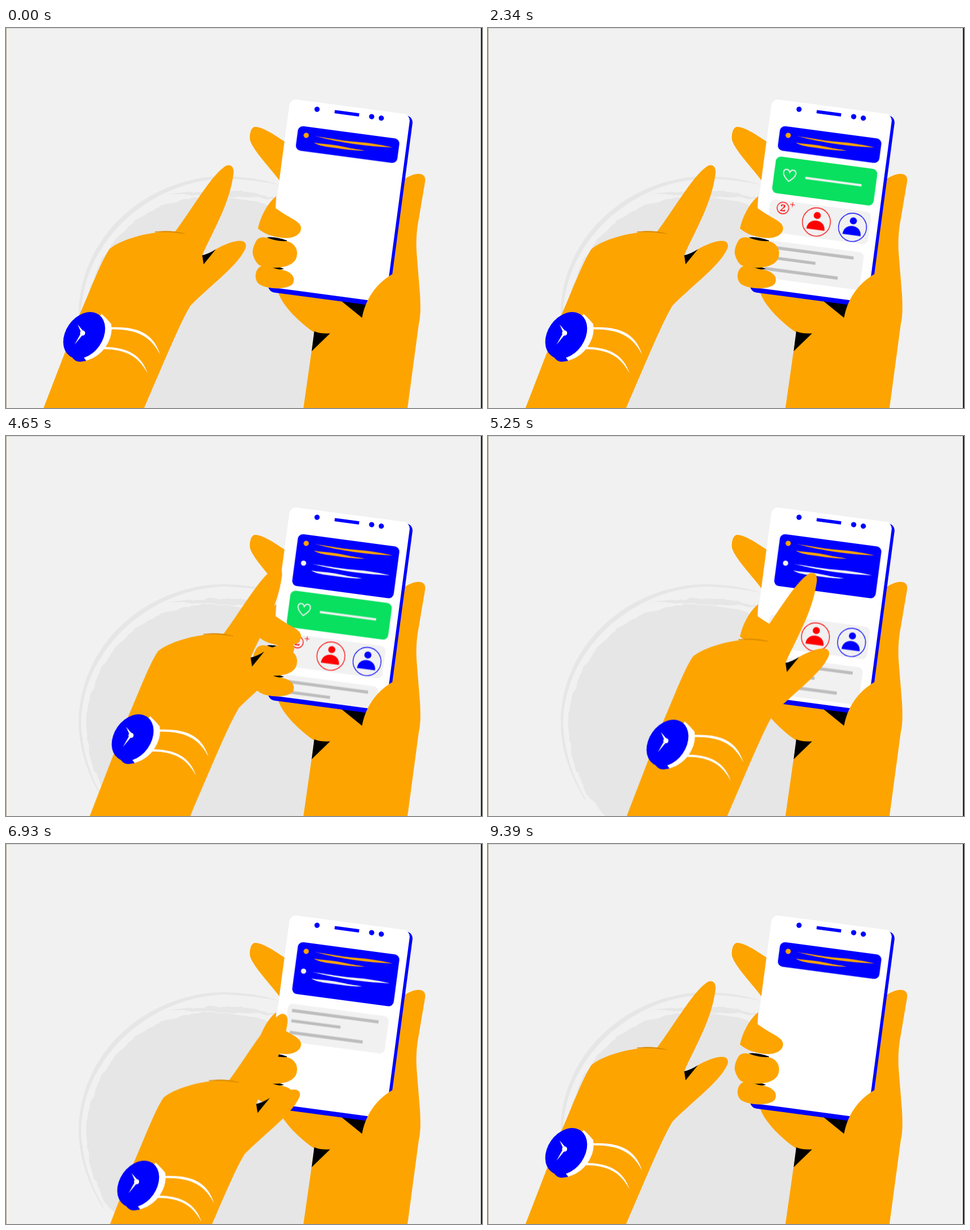
Write an HTML page without scripts that moves like this. It is 837 px wide and 669 px high and loops after 9540 ms.

```html
<!DOCTYPE html>
<html lang="en">
<head>
<meta charset="utf-8">
<title>Swiping cards on a phone</title>
<style>
  html, body { margin: 0; width: 100%; height: 100%; overflow: hidden; background: #f1f1f1; }
  svg { display: block; width: 837px; height: 669px; }
  .skin { fill: #fda400; }
  .blue { fill: #00f; }
  .panel { fill: #f1f1f1; }
  .bars { stroke: #bdbdbd; stroke-width: 5.4; }
  .count { font: bold 17px "Noto Serif", serif; fill: #f00; text-anchor: middle; }

  .move { animation: 9540ms ease-in-out infinite; }
  #hand { animation-name: hand; }
  #index { animation-name: press; transform-origin: 320px 385px; }
  #board { animation-name: board; }
  #second { animation-name: second; }
  #cards { animation-name: cards; }
  #like { animation-name: like; }
  #list { animation-name: list; }
  #people { animation-name: people; }
  #note { animation-name: note; }

  @keyframes hand {
    0%, 26.73% { transform: translate(0, 0); }
    30.82%, 32.39% { transform: translate(189px, 3px); }
    37.11% { transform: translate(183px, 49px); }
    42.45% { transform: translate(138px, -67px); animation-timing-function: ease-out; }
    44.65%, 46.86% { transform: translate(0, 0); animation-timing-function: ease-in; }
    48.74% { transform: translate(85px, -10.5px); animation-timing-function: ease-out; }
    50% { transform: translate(95px, 15px); }
    53.14% { transform: translate(260px, -60px); }
    56.92% { transform: translate(98px, 57.5px); }
    58.18% { transform: translate(91px, 57.5px); animation-timing-function: ease-in; }
    61.64% { transform: translate(173px, 57.5px); animation-timing-function: ease-out; }
    64.47% { transform: translate(270px, 57.5px); }
    72.64% { transform: translate(95px, 57.5px); animation-timing-function: linear; }
    73.27% { transform: translate(90px, 57.5px); }
    79.56% { transform: translate(270px, 57.5px); }
    85.22% { transform: translate(215px, -51px); }
    87.11% { transform: translate(218px, -61px); }
    88.68% { transform: translate(219px, -67px); }
    90.25%, 92.45% { transform: translate(213px, -61px); }
    98.43%, 100% { transform: translate(0, 0); }
  }
  @keyframes press {
    0%, 58.18%, 66.98%, 73.27%, 82%, 100% { transform: none; }
    61.64%, 63%, 76.5%, 78.5% { transform: rotate(5deg) scale(.975); }
  }
  @keyframes board {
    0%, 32.39% { height: 43.4px; }
    37.11%, 87.11% { height: 92px; }
    90.25%, 100% { height: 43.4px; }
  }
  @keyframes second {
    0%, 33.5% { opacity: 0; }
    37.11%, 87.11% { opacity: 1; }
    89.5%, 100% { opacity: 0; }
  }
  @keyframes cards {
    0%, 32.39% { transform: translateY(0); }
    37.11%, 100% { transform: translateY(46.4px); }
  }
  @keyframes like {
    0%, 5.03% { transform: translateY(50px); opacity: 0; animation-timing-function: ease-out; }
    12.58%, 50% { transform: translate(0, 0); opacity: 1; }
    53.14%, 100% { transform: translateX(205px); opacity: 1; }
  }
  @keyframes list {
    0%, 53.14% { transform: translateY(0); }
    56.92%, 100% { transform: translateY(-67px); }
  }
  @keyframes people {
    0%, 15.09% { opacity: 0; transform: translateX(0); }
    18.24%, 58.18% { opacity: 1; transform: translateX(0); animation-timing-function: ease-in; }
    61.64% { opacity: 1; transform: translateX(82px); animation-timing-function: ease-out; }
    64.47%, 100% { opacity: 1; transform: translateX(205px); }
  }
  @keyframes note {
    0%, 21.38% { opacity: 0; transform: translate(0, 0); }
    24.53%, 64.47% { opacity: 1; transform: translate(0, 0); }
    69.18%, 73.27% { opacity: 1; transform: translate(0, -72px); }
    79.56%, 100% { opacity: 1; transform: translate(205px, -72px); }
  }
</style>
</head>
<body>
<svg viewBox="0 0 837 669">
  <defs>
    <clipPath id="screen"><rect width="213.5" height="333.6" rx="12"/></clipPath>
    <filter id="rough" x="-5%" y="-5%" width="110%" height="110%">
      <feTurbulence type="fractalNoise" baseFrequency=".06" numOctaves="2" seed="4"/>
      <feDisplacementMap in="SourceGraphic" scale="7" xChannelSelector="R" yChannelSelector="G"/>
    </filter>
    <g id="message">
      <circle cx="36.5" cy="60.3" r="4.6"/>
      <path d="M51.7 59.5C80 60 100 61.5 125 60S170 59.5 190 61.5C165 63.5 140 65 110 64S75 62 51.7 59.500Z"/>
      <path d="M51.3 71.3C70 72 85 69.5 105 71.5S130 72 142 73.5C120 76.5 100 75.5 80 75.5S60 74 51.3 71.3Z"/>
    </g>
    <g id="person" fill="currentColor">
      <ellipse rx="24.6" ry="24.9" fill="none" stroke="currentColor" stroke-width="1.3"/>
      <circle cy="-11.5" r="6.2"/>
      <path d="M-16 13.5C-16-7.8 16-7.8 16 13.5Z"/>
    </g>
  </defs>

  <rect width="837" height="669" fill="#f1f1f1"/>

  <!-- brushed disc -->
  <g fill="#e6e6e6">
    <g filter="url(#rough)">
      <path d="M208 672C160 620 141 565 141 508C143 430 190 350 270 315Q300 303 345 296Q420 296 480 320L640 420V672Z"/>
      <path d="M288 292Q350 284 400 287Q450 291 480 301Q430 297 400 298Q340 292 288 292Z"/>
    </g>
    <path d="M170 640C140 590 128 545 128 505C128 365 250 261 385 261Q440 262 484 277Q440 267 385 265C258 268 136 370 132 505Q134 575 172 640Z"/>
    <circle cx="805" cy="501" r="1"/>
  </g>

  <!-- holding hand, behind the phone -->
  <g class="skin">
    <path d="M500 207L490 200C470 187 452 174 437 174C430 176 428 188 429 197C434 215 462 243 482 270H500Z"/>
    <path d="M478 464C486 490 518 520 542 536L523 669H706L726 520Q730 505 728 470L722 395Q720 365 726 335L737 270C739 254 722 252 700 266L640 440Z"/>
  </g>
  <path d="M590 481L638 484L627 511ZM542 534Q555 539 570 537.5L537.5 569Z"/>

  <!-- phone -->
  <g transform="translate(499.7 124.4) rotate(7.6)">
    <rect class="blue" x="5.2" y="2.5" width="213.7" height="339.500" rx="12"/>
    <rect width="213.5" height="333.6" rx="12" fill="#fff"/>
    <g class="blue">
      <circle cx="49.3" cy="12.3" r="4.6"/>
      <rect x="80.5" y="9.3" width="43.5" height="6" rx="1"/>
      <circle cx="146.2" cy="12.4" r="4.6"/>
      <circle cx="163.4" cy="12.8" r="4.6"/>
    </g>
    <g clip-path="url(#screen)">
      <g id="cards" class="move">
        <g id="list" class="move">
          <g id="note" class="move">
            <rect class="panel" x="17.5" y="247.4" width="179" height="66.7" rx="9"/>
            <path class="bars" d="M25.5 259.2H179M26.8 277.4H113.8M26.5 298H156"/>
          </g>
          <g id="people" class="move">
            <rect class="panel" x="20.8" y="175.3" width="179" height="57.5" rx="9"/>
            <circle cx="44.2" cy="188.3" r="10.2" fill="none" stroke="#f00" stroke-width="1.3"/>
            <text class="count" x="44.2" y="194.3">2</text>
            <path d="M56 180.2H64.4M60.2 176V184.4" stroke="#f00"/>
            <use href="#person" x="105.8" y="204.9" color="#f00"/>
            <use href="#person" x="170" y="205.9" color="#00f"/>
          </g>
        </g>
        <g id="like" class="move">
          <rect x="20.8" y="99.1" width="180" height="65" rx="9" fill="#09e05f"/>
          <path d="M47.9 140.5C42 136 37 131 37 126C37 119 45 117.500 47.9 124.500C50.5 117.500 58.8 119 58.8 126C58.8 131 53.8 136 47.9 140.500Z" fill="none" stroke="#f1f1f1" stroke-width="2"/>
          <path d="M76.3 130.6H176" stroke="#f1f1f1" stroke-width="4"/>
        </g>
      </g>
      <rect id="board" class="move blue" x="20.8" y="45.1" width="180" height="43.4" rx="9"/>
      <use href="#message" class="skin"/>
      <g id="second" class="move" fill="#f1f1f1"><use href="#message" y="35.2"/></g>
    </g>
  </g>

  <!-- holding hand, in front of the phone -->
  <path d="M459 368.500Q475 367 494 374V378H470ZM454 419Q470 416 489 424Q470 429 454 419Z"/>
  <g class="skin">
    <path d="M680 433C650 450 632 478 626 510L650 560H715L726 505L722 440Z"/>
    <path d="M475 296C457 311 447 335 443 353C455 364 478 371 498 369.500C517 367 523 354 516 345C508 336 492 331 474 317Z"/>
    <path d="M440 375C435 383 433 392 434 398C437 409 442 417 449 419C475 426 507 421 511 403C515 388 505 377 492 375C482 376 470 373 460 369.500C450 367 443 369 440 375Z"/>
    <path d="M447 420C437 427 437 441 443 449C455 461 498 462 505 449C511 435 495 426 480 425C468 422 455 416 447 420Z"/>
  </g>

  <!-- swiping hand -->
  <g id="hand" class="move">
    <path id="index" class="skin move" d="M285 378L297 359C325 322 358 264 382 246C392 237 402 242 400 257C393 310 365 355 345 400L325 420Z"/>
    <path class="skin" d="M66 669L130 503C150 458 165 415 182 389C200 374 245 358 297 358L325 365L345 400L352 404L368 390C390 378 408 372 418 376C425 381 422 388 415 399C398 425 356 457 325 488C308 514 275 595 243 669L203 770H26Z"/>
    <path d="M345 400Q356 398 369 389.5L347.5 416Z"/>
    <path d="M262 359Q290 355.500 314 362Q288 357.500 262 359Z" fill="#d98a00" stroke="#d98a00"/>
    <g fill="#fff">
      <path d="M184 527C235 525 260 540 271 575C254 542 230 530 184 530.5Z"/>
      <path d="M172 561.5C215 562 238 576 249 608C233 578 210 565 170 565.5Z"/>
      <path d="M168 503L178 513L185 521Q188 537 180 553C172 570 158 581 140 586L130 570Z"/>
    </g>
    <path class="blue" d="M101 552L104 566L119 583Q124 588 131 587.500L141 586L134 576L138 541Z"/>
    <ellipse class="blue" cx="137.5" cy="541" rx="32.5" ry="44.5" transform="rotate(35 137.5 541)"/>
    <g fill="#fff">
      <circle cx="134.7" cy="537" r="4.5"/>
      <path d="M126 522L137 535L133 538ZM120.5 557.5L133 535L136.5 538Z"/>
    </g>
  </g>

  <path d="M0 .5H837" stroke="#cfcfcf"/>
  <path d="M.5 0V669" stroke="#a89c88"/>
  <path d="M836 0V669" stroke="#222" stroke-width="2"/>
</svg>
</body>
</html>
```
